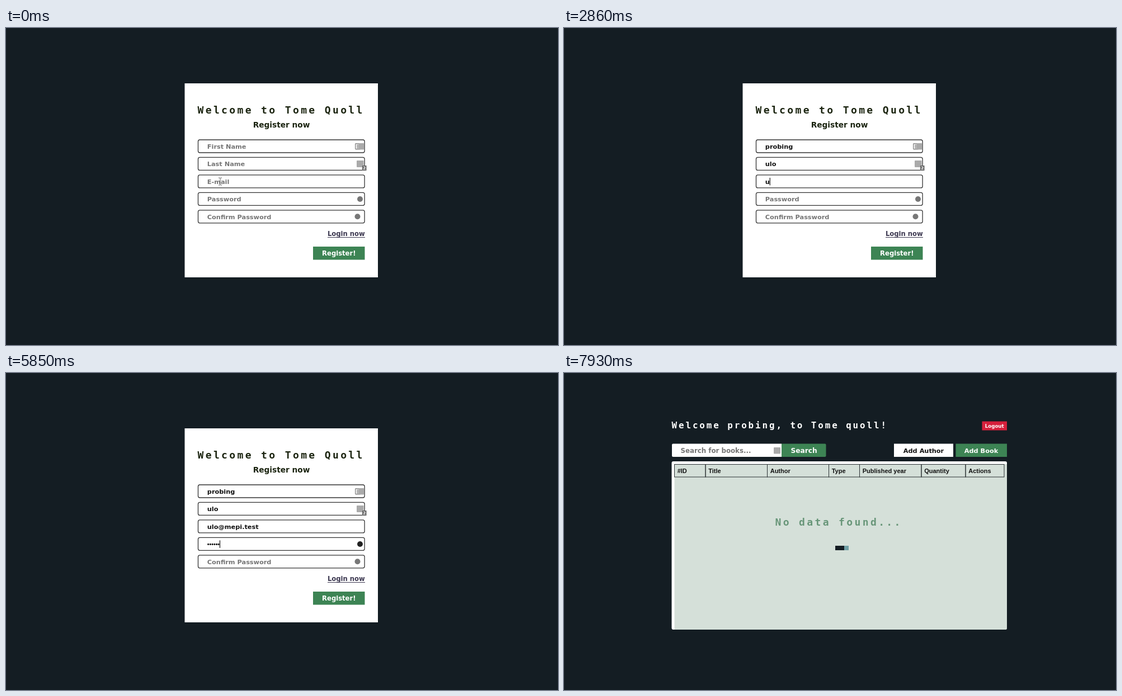
An HTML page that plays this animation: 987 px wide and 567 px high, repeating every 8000 ms.

```html
<!DOCTYPE html>
<html lang="en">
<head>
<meta charset="utf-8">
<title>Register</title>
<style>
  html, body { margin: 0; width: 100%; height: 100%; overflow: hidden; background: #141d23; }
  svg { display: block; width: 987px; height: 567px; }
  text { font: bold 11.3px "DejaVu Sans", sans-serif; white-space: pre; }
  .pixel { font: bold 18px "DejaVu Sans Mono", monospace; letter-spacing: .187em; }
  .hello { font-size: 15.8px; fill: #fff; }
  .dark { fill: #1b2410; }
  .mid { text-anchor: middle; }
  .green { fill: #3d8454; }
  .white { fill: #fff; }
  .hint { fill: #757575; }
  .value { fill: #111; }
  .dots { font: bold 10.6px "Liberation Sans", sans-serif; }
  .box { fill: #fff; stroke: #333; stroke-width: 1.3; }
  .badge { fill: #aaa; }
  .head { font: bold 11px "Liberation Sans", sans-serif; fill: #111; }
  .grid { fill: none; stroke: #2a3033; }
</style>
</head>
<body>
<svg viewBox="0 0 987 567">
  <g id="register">
    <rect class="white" x="319.5" y="99" width="345.5" height="347"/>
    <text class="pixel dark" x="342.5" y="153">Welcome to Tome Quoll</text>
    <text class="mid dark" x="492.5" y="177.5" style="font-size:13.7px">Register now</text>
    <g id="fields"></g>
    <g id="card" fill="none" stroke-width="1.4">
      <rect x="624.7" y="206.7" width="9" height="10" rx="1"/>
      <path d="M627 209.5h4M627 212h4M627 214.5h4"/>
    </g>
    <rect class="badge" x="630.5" y="206" width="9.5" height="11.5" rx="1"/>
    <rect class="badge" x="627" y="237" width="12.5" height="12" rx="1"/>
    <rect x="637" y="246" width="7.5" height="9" fill="#666"/>
    <text class="mid white" x="640.8" y="253.3" style="font-size:7px">2</text>
    <circle class="key" cx="633" cy="306" r="5"/>
    <circle class="key" cx="628.5" cy="337.3" r="5"/>
    <text x="641.8" y="372.4" text-anchor="end" fill="#3c3850" style="font-size:11.6px">Login now</text>
    <path d="M575 374.5h67" stroke="#3c3850"/>
    <rect class="green" x="549" y="391" width="92.5" height="23.5"/>
    <text class="mid white" x="595.3" y="407" style="font-size:11.6px">Register!</text>
    <rect id="caret" width="1.2" height="13.5" fill="#111"/>
    <path id="beam" d="M-3 -6.5h2.2l.8 .8l.8 -.8h2.2M0 -5.7V5.7M-3 6.5h2.2l.8 -.8l.8 .8h2.2" fill="none" stroke="#666"/>
  </g>

  <g id="library">
    <text class="pixel hello" x="192.5" y="99">Welcome probing, to Tome quoll!</text>
    <rect x="747.5" y="86.5" width="44.5" height="16" fill="#d6203c"/>
    <text class="mid white" x="769.7" y="98" style="font-size:8.7px">Logout</text>
    <path class="white" d="M195 126.500h194v23.500h-194q-2 0 -2 -2v-19.500q0 -2 2 -2z"/>
    <text class="hint" x="208.500" y="142.600" style="font-size:11.8px">Search for books...</text>
    <rect class="badge" x="375" y="133" width="12" height="11.5" rx="1"/>
    <path class="green" d="M389 126.500h77.500q2 0 2 2v19.500q0 2 -2 2h-77.500z"/>
    <text class="mid white" x="429" y="142.600" style="font-size:12.2px">Search</text>
    <rect class="white" x="590" y="126.500" width="106" height="23.500"/>
    <text class="mid value" x="643" y="142.600">Add Author</text>
    <rect class="green" x="700.5" y="126.500" width="91.500" height="23.500"/>
    <text class="mid white" x="746" y="142.600">Add Book</text>
    <rect class="white" x="192.500" y="158" width="599.500" height="301" rx="3"/>
    <path d="M197.500 163h594.500v293q0 3 -3 3h-591.500z" fill="#d5e0d9"/>
    <g id="columns"></g>
    <text class="pixel" x="377.500" y="272.500" fill="#689679">No data found...</text>
    <g id="loader">
      <rect x="485" y="309" width="8" height="8"/>
      <rect x="493" y="309" width="8" height="8"/>
      <rect x="501" y="309" width="8" height="8"/>
    </g>
  </g>
</svg>
<script>
const LOOP = 8000, TICK = 130, SWITCH = 7670, BLINK = 530;
const $ = id => document.getElementById(id);

function add(parent, tag, attrs, content = '') {
  const el = document.createElementNS('http://www.w3.org/2000/svg', tag);
  for (const k in attrs) el.setAttribute(k, attrs[k]);
  el.textContent = content;
  return parent.appendChild(el);
}

// keys: the moment each character is typed
const fields = [
  { hint: 'First Name', value: 'probing', focus: 650, keys: [780, 910, 1040, 1170, 1300, 1430, 1560] },
  { hint: 'Last Name', value: 'ulo', focus: 1820, keys: [2080, 2210, 2470] },
  { hint: 'E-mail', value: 'ulo@mepi.test', focus: 2600,
    keys: [2860, 3120, 3250, 3640, 3770, 3900, 4030, 4030, 4290, 4420, 4680, 4680, 4810] },
  { hint: 'Password', value: '••••••', secret: true, focus: 4940, keys: [5460, 5460, 5590, 5590, 5850, 5850] },
  { hint: 'Confirm Password', value: '••••••', secret: true, focus: 6110, keys: [6240, 6240, 6500, 6500, 6630, 6760] }
];

fields.forEach((f, i) => {
  f.y = 200 + i * 31.45;
  add($('fields'), 'rect', { class: 'box', x: 343.5, y: f.y, width: 297.6, height: 23, rx: 3 });
  f.text = add($('fields'), 'text', { x: 359.8, y: f.y + 15.8 });
});

const edges = [197.5, 253, 363.5, 473.5, 528.5, 639, 718, 787];
['#ID', 'Title', 'Author', 'Type', 'Published year', 'Quantity', 'Actions'].forEach((name, i) => {
  const x = edges[i];
  add($('columns'), 'rect', { class: 'grid', x, y: 163.5, width: edges[i + 1] - x, height: 22.5 });
  add($('columns'), 'text', { class: 'head', x: x + 5.2, y: 178.5 }, name);
});

const circles = document.querySelectorAll('.key');
const blocks = [...$('loader').children];
const ease = p => p * p * (3 - 2 * p);

function drawForm(t) {
  let active = null, touched = 0;
  for (const f of fields) {
    const typed = f.keys.filter(k => k <= t);
    f.text.textContent = typed.length ? f.value.slice(0, typed.length) : f.hint;
    f.text.setAttribute('class', typed.length ? (f.secret ? 'value dots' : 'value') : 'hint');
    if (f.focus <= t) {
      active = f;
      f.count = typed.length;
      touched = Math.max(f.focus, ...typed);
    }
  }

  const caret = $('caret');
  caret.style.display = active && (t - touched) % (2 * BLINK) < BLINK ? '' : 'none';
  if (active) {
    caret.setAttribute('x', 359.6 + (active.count ? active.text.getComputedTextLength() : 0));
    caret.setAttribute('y', active.y + 5);
  }

  const p = ease(Math.min(1, t / 520));
  $('beam').setAttribute('transform', `translate(${383 + 10 * p} ${274.5 - 63 * p})`);
  $('beam').style.display = t < 1820 ? '' : 'none';

  $('card').setAttribute('stroke', active === fields[0] ? '#333' : '#888');
  circles.forEach((c, i) => c.setAttribute('fill', active === fields[3 + i] ? '#222' : '#777'));
}

function draw(now) {
  const t = Math.floor((now % LOOP) / TICK) * TICK;
  const done = t >= SWITCH;
  $('register').style.display = done ? 'none' : '';
  $('library').style.display = done ? '' : 'none';
  if (done) {
    const lit = (t - SWITCH) / TICK % 3;
    blocks.forEach((b, i) => b.setAttribute('fill', i === lit ? '#6f9fa5' : '#141d23'));
  } else {
    drawForm(t);
  }
}

const start = performance.now();
function loop() {
  draw(performance.now() - start);
  requestAnimationFrame(loop);
}
loop();
</script>
</body>
</html>
```
